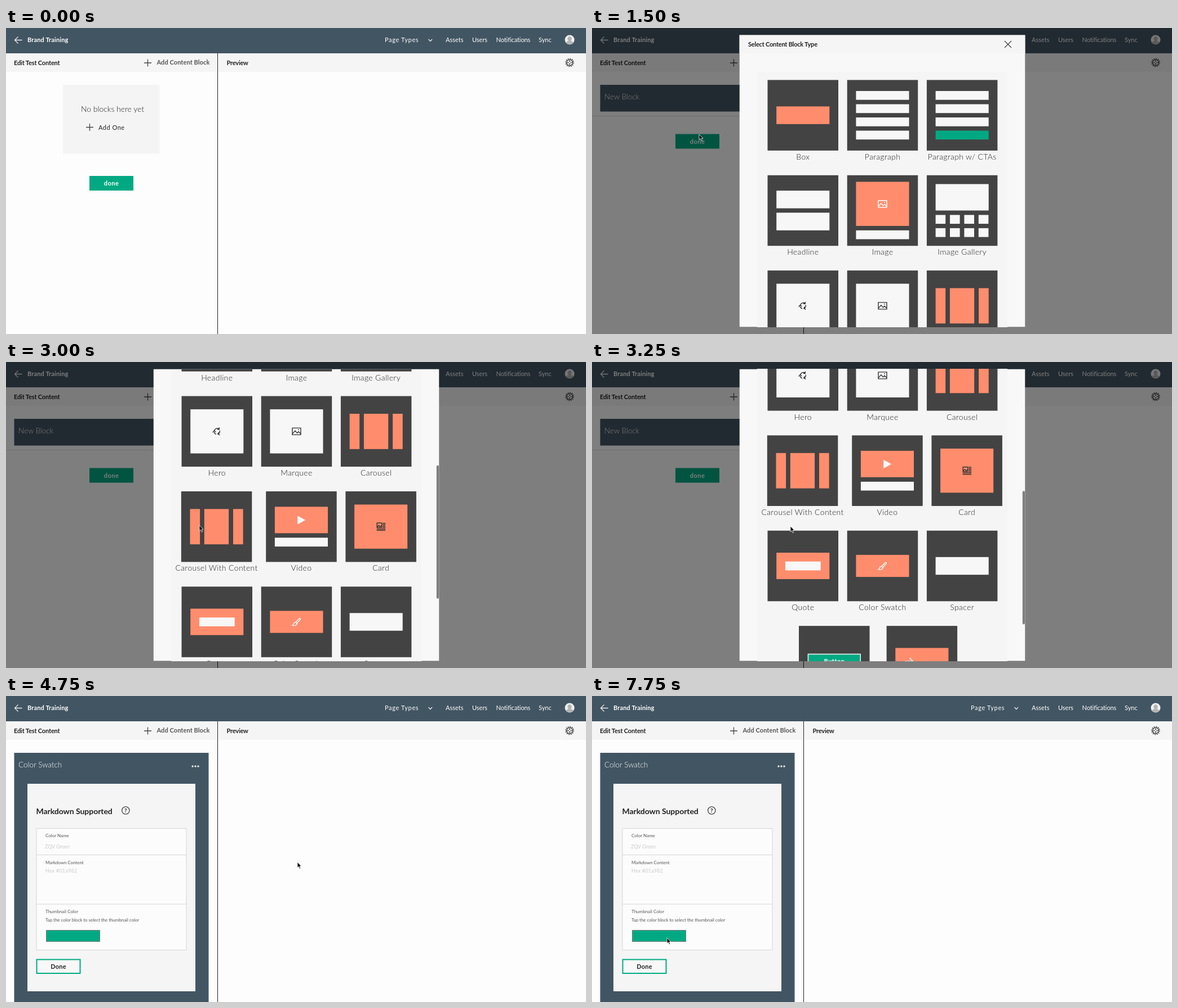
Write an HTML page that moves like this. It is 1029 px wide and 544 px high and loops after 8 s.

```html
<!DOCTYPE html>
<html lang="en">
<head>
<meta charset="utf-8">
<title>Content block editor</title>
<style>
html, body { margin: 0; width: 100%; height: 100%; overflow: hidden; background: #fdfdfd; }
svg { display: block; width: 1029px; height: 544px; }
text { font: 400 11px Lato, "Open Sans", sans-serif; fill: #222; white-space: pre; }
.b { font-weight: 700; }
.l { font-weight: 300; font-size: 13.5px; }
.s { font-size: 8px; fill: #555; }
.ph { font-size: 9px; fill: #ccc; }
.w { fill: #fff; }
.mid { text-anchor: middle; }
.label { font-size: 14px; font-weight: 300; letter-spacing: .35px; text-anchor: middle; }
.line { fill: none; stroke: #444; stroke-width: 1.3; }
.nav .line { stroke: #e6eaed; }

.anim { animation: 8s step-end infinite; }
#empty { animation-name: empty; }
#fresh, #modal { animation-name: adding; }
#form { animation-name: form; }
#list { animation-name: scroll; }
#thumb { animation-name: thumb; }
#cursor { animation-name: cursor; }

@keyframes empty { 0% { visibility: visible } 18.75%, 100% { visibility: hidden } }
@keyframes adding { 0% { visibility: hidden } 18.75% { visibility: visible } 59.375%, 100% { visibility: hidden } }
@keyframes form { 0% { visibility: hidden } 59.375%, 100% { visibility: visible } }
@keyframes scroll {
  0% { transform: translateY(0) }
  28.125% { transform: translateY(-95px) }
  31.25% { transform: translateY(-249px) }
  34.375% { transform: translateY(-310px) }
  37.5% { transform: translateY(-370.5px) }
  40.625% { transform: translateY(-470px) }
  43.75% { transform: translateY(-525px) }
  46.875%, 100% { transform: translateY(-539.3px) }
}
@keyframes thumb {
  0% { transform: translateY(13.7px); opacity: 0; fill: #7f7f7f }
  28.125% { transform: translateY(57.3px); opacity: 1; fill: #7f7f7f }
  31.25% { transform: translateY(128px); opacity: 1; fill: #7f7f7f }
  34.375% { transform: translateY(156px); opacity: 1; fill: #7f7f7f }
  37.5% { transform: translateY(183.7px); opacity: 1; fill: #7f7f7f }
  40.625% { transform: translateY(229.3px); opacity: 1; fill: #7f7f7f }
  43.75% { transform: translateY(254.5px); opacity: 1; fill: #7f7f7f }
  46.875% { transform: translateY(261px); opacity: 1; fill: #7f7f7f }
  50% { transform: translateY(261px); opacity: 1; fill: #bbb }
  53.125%, 100% { transform: translateY(261px); opacity: 1; fill: #fefefe }
}
@keyframes cursor {
  0% { transform: translate(320px, 206px); opacity: 0 }
  3.125% { transform: translate(300px, 206px); opacity: 1 }
  6.25% { transform: translate(218px, 197px) }
  9.375% { transform: translate(193px, 191px) }
  12.5% { transform: translate(190px, 189px) }
  21.875% { transform: translate(240px, 228px) }
  25% { transform: translate(328px, 284px) }
  28.125% { transform: translate(343px, 290.5px) }
  40.625% { transform: translate(352px, 292px) }
  43.75% { transform: translate(440px, 299px) }
  46.875% { transform: translate(511px, 298px) }
  50% { transform: translate(517px, 295.5px) }
  62.5% { transform: translate(478px, 297px) }
  65.625% { transform: translate(335px, 294px) }
  68.75% { transform: translate(190px, 284px) }
  71.875% { transform: translate(141px, 279px) }
  75% { transform: translate(138.5px, 275.5px) }
  87.5% { transform: translate(137px, 330px) }
  90.625% { transform: translate(136px, 420px) }
  93.75% { transform: translate(140px, 467px) }
  96.875%, 100% { transform: translate(133px, 430px); opacity: 1 }
}
</style>
</head>
<body>
<svg viewBox="0 0 1029 544">
  <defs>
    <clipPath id="frame"><rect x="261.5" y="12.5" width="507" height="519"/></clipPath>
    <path id="plus" class="line" d="M-6.5 0H6.5M0 -6.5V6.5"/>
  </defs>

  <rect width="1029" height="544" fill="#fdfdfd"/>
  <rect y="45" width="1029" height="33" fill="#f5f5f5"/>
  <g class="nav">
    <rect width="1029" height="45" fill="#425563"/>
    <path class="line" d="M28.5 21.5H15.5M21.5 15.5L15.5 21.5L21.5 27.5"/>
    <text class="b w" x="38" y="24.5" letter-spacing=".15">Brand Training</text>
    <text class="w" x="672" y="25" letter-spacing=".65">Page Types</text>
    <path class="line" d="M749.5 20L752.8 23.5L756 20"/>
    <text class="w" x="780" y="25">Assets</text>
    <text class="w" x="827" y="25">Users</text>
    <text class="w" x="869.5" y="25" letter-spacing="-.08">Notifications</text>
    <text class="w" x="945" y="25">Sync</text>
    <circle cx="1000" cy="21" r="8.5" fill="#f0f0f0"/>
    <path d="M993.5 26.5Q994 23.5 998 23.2Q996 21 996.3 18.5Q997 15 1000 15T1003.7 18.5Q1004 21 1002 23.2Q1006 23.5 1006.5 26.5Q1000 31.5 993.5 26.5Z" fill="#b4b4b4"/>
  </g>
  <text class="b" x="14" y="65.5" letter-spacing="-.15">Edit Test Content</text>
  <use href="#plus" x="251.5" y="62"/>
  <text class="b" x="267.5" y="65" letter-spacing=".08" style="fill:#555">Add Content Block</text>
  <text class="b" x="391.5" y="65.5" letter-spacing="-.2">Preview</text>
  <g class="line" transform="translate(1000 61.5)">
    <circle r="5.2"/>
    <circle r="6.8" stroke-width="2" stroke-dasharray="1.78 1.78"/>
    <path d="M0 -2.5L2.5 0L0 2.5L-2.5 0ZM0 -5V-2.5M0 5V2.5M-5 0H-2.5M5 0H2.5" stroke-width="1"/>
  </g>

  <g id="empty" class="anim">
    <rect x="101" y="101" width="171.5" height="122.5" fill="#f4f4f4"/>
    <text class="l" x="133" y="148.5" style="font-size:14px" letter-spacing="-.05">No blocks here yet</text>
    <use href="#plus" x="148.5" y="176.5"/>
    <text x="164" y="181" letter-spacing=".5">Add One</text>
    <rect x="148" y="263" width="78" height="26" fill="#01a982"/>
    <text class="b w mid" x="187" y="280" letter-spacing=".5">done</text>
  </g>

  <g id="fresh" class="anim">
    <rect x="14.5" y="101" width="345" height="47.5" fill="#425563"/>
    <text class="l w" x="22" y="127" letter-spacing="-.05">New Block</text>
    <path d="M0 156.5H375" stroke="#ddd"/>
    <rect x="148" y="188.5" width="78" height="26" fill="#01a982"/>
    <text class="b w mid" x="187" y="205.5" letter-spacing=".5">done</text>
  </g>

  <g id="form" class="anim">
    <rect x="14.5" y="101" width="345" height="443" fill="#425563"/>
    <text class="l w" x="22" y="127">Color Swatch</text>
    <path d="M331 125h0M336 125h0M341 125h0" stroke="#e6eaed" stroke-width="3.4" stroke-linecap="round"/>
    <rect x="38" y="156" width="298" height="369" fill="#f5f5f5"/>
    <text class="b" x="53.5" y="209.5" style="font-size:14px" letter-spacing="-.05">Markdown Supported</text>
    <circle class="line" cx="212.3" cy="203.5" r="6.7"/>
    <text class="b mid" x="212.3" y="207.2" style="font-size:10px">?</text>
    <path d="M54 235.5H320V451.5H54ZM54 282.5H320M54 370H320" fill="#fcfcfc" stroke="#d6d6d6"/>
    <text class="s" x="70" y="250.5">Color Name</text>
    <text class="ph" x="69" y="271" letter-spacing="-.1">ZQV Green</text>
    <text class="s" x="70" y="298.5" letter-spacing="-.05">Markdown Content</text>
    <text class="ph" x="70" y="314" letter-spacing=".2">Hex #01a982</text>
    <text class="s" x="70" y="385.5">Thumbnail Color</text>
    <text class="s" x="70" y="401" letter-spacing="-.05">Tap the color block to select the thumbnail color</text>
    <rect x="71.5" y="416.5" width="95" height="20" fill="#01a982" stroke="#777"/>
    <rect x="54.5" y="468.5" width="77" height="24.5" fill="#f8f8f8" stroke="#01a982" stroke-width="2"/>
    <text class="b mid" x="93" y="485" letter-spacing=".25">Done</text>
  </g>

  <path d="M375.5 45V544" stroke="#222"/>

  <g id="modal" class="anim">
    <rect width="1029" height="544" opacity=".5"/>
    <g clip-path="url(#frame)">
      <rect x="261.5" y="12.5" width="507" height="519" fill="#f8f8f8"/>
      <g id="list" class="anim">
        <rect x="261.5" y="12.5" width="507" height="33" fill="#f5f5f5"/>
        <text class="b" x="277" y="33" letter-spacing="-.22">Select Content Block Type</text>
        <path class="line" d="M732 23L744 35M744 23L732 35"/>
        <rect x="293" y="78" width="444" height="1060" fill="#f5f5f5"/>
        <g id="tiles"></g>
      </g>
      <rect id="thumb" class="anim" x="763.8" width="4.2" height="237" rx="2"/>
    </g>
  </g>

  <path id="cursor" class="anim" d="M0 0V9.8L2.3 7.7L4 11.6L5.7 10.9L4 7.1H7.1Z" fill="#000" stroke="#fff" stroke-width=".8"/>
</svg>

<script>
const ORANGE = '#ff8d6d', GREEN = '#01a982', WHITE = '#f7f7f7', DARK = '#333';
const SIZE = 125.5, MID = SIZE / 2, ROW = 169.35;

const rect = (x, y, w, h, fill) => `<rect x="${x}" y="${y}" width="${w}" height="${h}" fill="${fill}"/>`;
const bar = (y, h, fill = WHITE) => rect(15.7, y, 94.1, h, fill);
const icon = (d, color, y = MID) =>
  `<path transform="translate(${MID} ${y})" d="${d}" fill="none" stroke="${color}" stroke-width="1.4"/>`;

const picture = 'M-7.5 -6H7.5V6H-7.5ZM-7 4L-2.5 -1L1 3L3.5 .5L7 4M2.5 -3h2';
const cycle = 'M-4.5 -1.5A5 5 0 0 1 3.5 -4.2M4.8 -1.5A5 5 0 0 1 2 4.6M-1.2 5A5 5 0 0 1 -5 1' +
  'M4 -7V-3.6H.6M5 6.5L1.5 4.6L3.4 1.5M-7.6 1.8L-4.8 -1.6L-2 1.5';
const article = 'M-7 -6.5H1.5V1.5H-7ZM-6.5 .5L-4 -2.5L-1.5 0L1 -2M3 -6H8M3 -3.5H8M3 -1H8M3 1.5H8M-7.5 4H8M-7.5 6.5H8';
const brush = 'M-1.8 .8L5 -6.4Q7.4 -6.8 6.8 -4.4L.6 2.6ZM-1.8 .8Q-4.6 .6 -5 3.4Q-5.2 5.4 -7.2 6Q-2 7.6 0 4.8Q.8 3.6 .6 2.6';
const carousel = rect(15.7, 31.4, 17.6, 62.8, ORANGE) + rect(41, 31.4, 43.3, 62.8, ORANGE) + rect(92.2, 31.4, 17.6, 62.8, ORANGE);
const bars = last => [0, 1, 2, 3].map(i => bar(19.6 + 23.5 * i, 15.7, i < 3 ? WHITE : last)).join('');
const thumbs = [0, 1, 2, 3, 4, 5, 6, 7]
  .map(i => rect(15.7 + 25.4 * (i % 4), i < 4 ? 70.6 : 94.1, 17.6, 15.7, WHITE)).join('');

const rows = [
  [[311.5, 'Box', bar(47, 31.4, ORANGE)],
   [452.7, 'Paragraph', bars(WHITE)],
   [593.9, 'Paragraph w/ CTAs', bars(GREEN)]],
  [[311.5, 'Headline', bar(27.4, 31.4) + bar(66.6, 31.4)],
   [452.7, 'Image', bar(11.7, 78.4, ORANGE) + bar(98, 15.7) + icon(picture, '#fff', 51)],
   [593.9, 'Image Gallery', bar(15.7, 47) + thumbs]],
  [[311.5, 'Hero', bar(23.5, 78.4) + icon(cycle, DARK)],
   [452.7, 'Marquee', bar(23.5, 78.4) + icon(picture, DARK)],
   [593.9, 'Carousel', carousel]],
  [[310.8, 'Carousel With Content', carousel],
   [461.2, 'Video', bar(27.4, 47, ORANGE) + bar(82.4, 15.7) + '<path d="M56 43.3L70 51L56 58.7Z" fill="#f7f7f7"/>'],
   [602.4, 'Card', bar(23.5, 78.4, ORANGE) + icon(article, DARK)]],
  [[311.5, 'Quote', bar(39.2, 47, ORANGE) + rect(31.4, 54.9, 62.8, 15.7, WHITE)],
   [452.7, 'Color Swatch', bar(43.1, 39.2, ORANGE) + icon(brush, '#fff')],
   [593.9, 'Spacer', bar(47, 31.4)]],
  [[367, 'Button', `<rect x="16.4" y="50.2" width="92.8" height="25" fill="${GREEN}" stroke="#f7f7f7" stroke-width="1.5"/>` +
      '<text class="b w mid" x="63" y="66.8" letter-spacing=".5">Button</text>'],
   [522.6, 'Arrow Link (Download)', bar(39.2, 47, ORANGE) + icon('M-30 0H-16M-22 -6L-16 0L-22 6', '#fff')]]
];

document.getElementById('tiles').innerHTML = rows.map((row, r) => row.map(([x, name, art]) =>
  `<g transform="translate(${x} ${92.4 + r * ROW})">${rect(0, 0, SIZE, SIZE, '#434343')}${art}` +
  `<text class="label" x="${MID}" y="141.5">${name}</text></g>`).join('')).join('');
</script>
</body>
</html>
```
